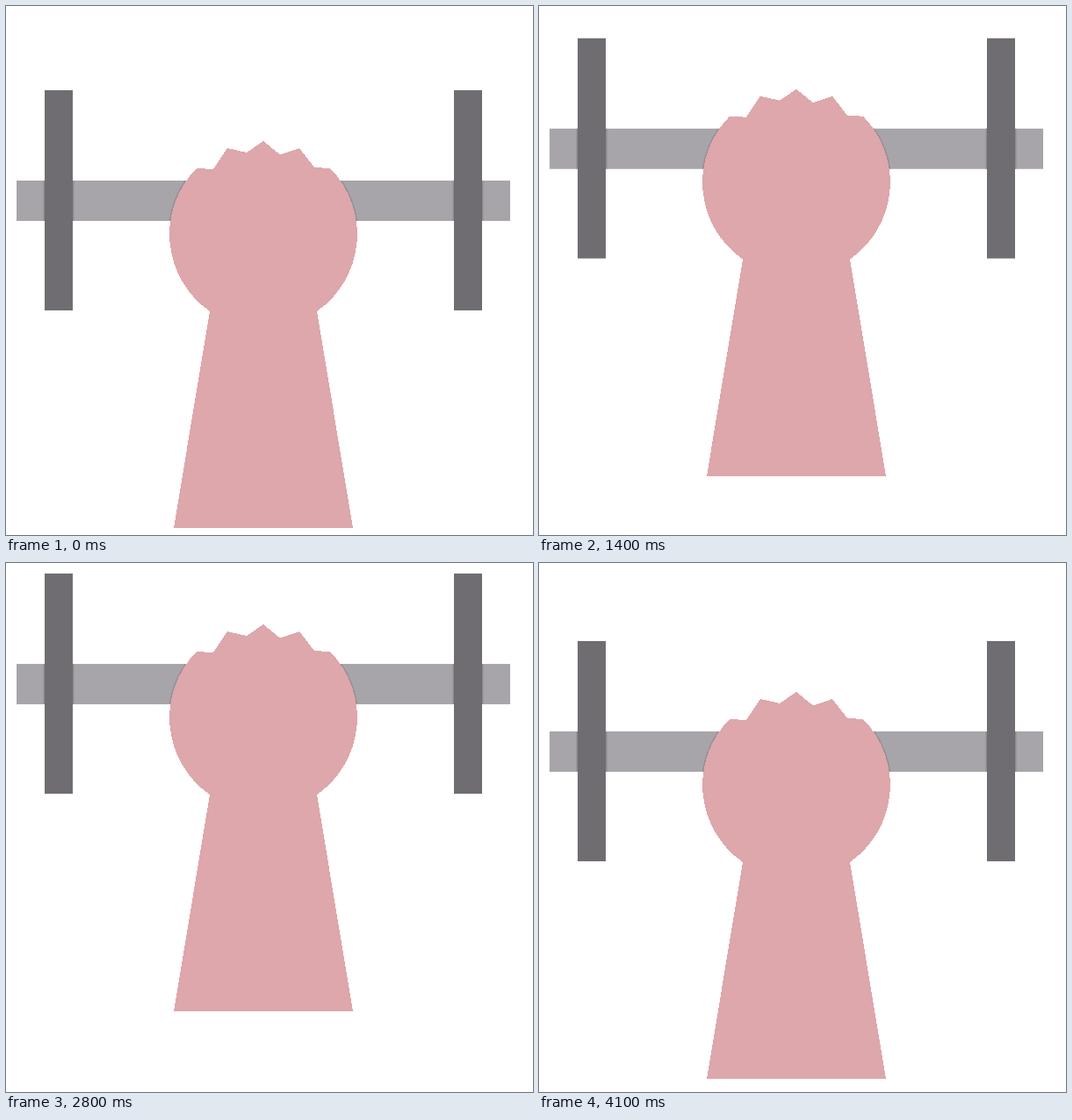
An HTML page that plays this animation: 600 by 603 pixels, repeating every 4.2 s.

```html
<!DOCTYPE html>
<html lang="en">
<head>
<meta charset="utf-8">
<title>Barbell lift</title>
<style>
  html, body { margin: 0; width: 100%; height: 100%; overflow: hidden; background: #fff; }
  svg { display: block; }
  .bar { fill: #a7a5a9; }
  .plate { fill: #706d72; }
  .seam { fill: #8d8b8f; }
  .rim { fill: none; stroke: #959095; stroke-width: 3; }
  .arm { fill: #dda7ab; shape-rendering: crispEdges; }
</style>
</head>
<body>
<svg width="600" height="603" viewBox="0 0 600 603">
  <defs>
    <clipPath id="barClip"><rect x="12" y="199" width="562" height="46"/></clipPath>
    <path id="arm" d="M191 595 L232 348 A107 107 0 0 1 217 185 L236 186 L252 162 L274 167
      L293 154 L312 169.5 L334 162 L351 184 L369 185 A107 107 0 0 1 354 348 L395 595 Z"/>
  </defs>
  <g id="lift">
    <rect class="bar" x="12" y="199" width="562" height="46"/>
    <path class="seam" d="M42.5 199h35v46h-35z M508.5 199h35v46h-35z"/>
    <path class="plate" d="M44 96h32v251h-32z M510 96h32v251h-32z"/>
    <g clip-path="url(#barClip)"><use href="#arm" class="rim"/></g>
    <use href="#arm" class="arm"/>
  </g>
</svg>
<script>
  const LOOP = 4200, STEP = 100, TOP = 84;
  const lift = document.getElementById('lift');

  const easeIn = (x, power) => x ** power;
  const easeOut = (x, power) => 1 - (1 - x) ** power;

  // push off, slow into the top, then sink and settle
  function height(t) {
    if (t < 700) return 19 * easeIn(t / 700, 2.7);
    if (t < 2400) return 19 + (TOP - 19) * easeOut((t - 700) / 1700, 1.82);
    if (t < 3700) return TOP - (TOP - 50) * easeIn((t - 2400) / 1300, 5.4);
    return 50 - 50 * easeOut((t - 3700) / 500, 1.22);
  }

  function draw() {
    const t = Math.floor(performance.now() % LOOP / STEP) * STEP;
    lift.setAttribute('transform', `translate(0 ${-height(t)})`);
    requestAnimationFrame(draw);
  }
  draw();
</script>
</body>
</html>
```
